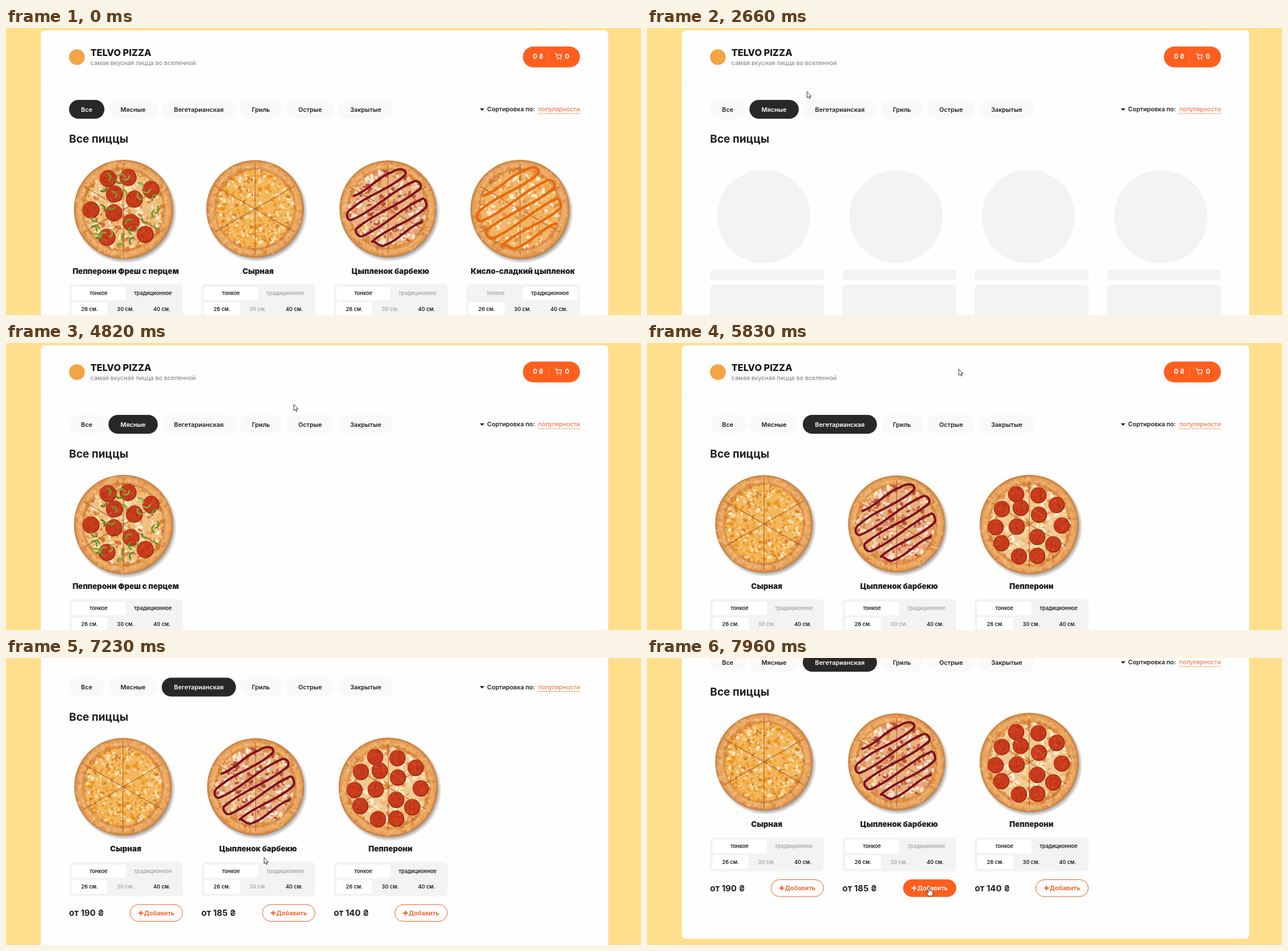
Animation of 1113x503 px, one loop 8000 ms. Source, as an HTML page:

```html
<!DOCTYPE html>
<html lang="ru">
<head>
<meta charset="utf-8">
<title>Pizza shop</title>
<style>
html, body { margin: 0; width: 100%; height: 100%; overflow: hidden; background: #ffdf8c; }
svg { display: block; width: 1113px; height: 503px; font-family: Inter, "Open Sans", sans-serif; }
text { white-space: pre; }
.toggle { animation: 8s step-end infinite; }
#all, #on0 { animation-name: all; }
#skeleton { animation-name: skeleton; }
#meat { animation-name: meat; }
#veg { animation-name: veg; }
#on1 { animation-name: on1; }
#on2 { animation-name: on2; }
#hand { animation-name: hand; }
#arrow { animation-name: arrow; }
#hover { animation: hover 8s linear infinite; }
#page { animation: scroll 8s linear infinite; }
#cursor { animation: move 8s linear infinite; }

@keyframes all { 0% { visibility: visible } 28.125%, 100% { visibility: hidden } }
@keyframes skeleton { 0% { visibility: hidden } 28.125% { visibility: visible } 49.25%, 100% { visibility: hidden } }
@keyframes meat { 0% { visibility: hidden } 49.25% { visibility: visible } 68%, 100% { visibility: hidden } }
@keyframes veg { 0% { visibility: hidden } 68%, 100% { visibility: visible } }
@keyframes on1 { 0% { visibility: hidden } 28.125% { visibility: visible } 66%, 100% { visibility: hidden } }
@keyframes on2 { 0% { visibility: hidden } 66%, 100% { visibility: visible } }
@keyframes hand {
  0%, 29.9%, 67.5% { visibility: hidden }
  18.5%, 64.2%, 96.6%, 100% { visibility: visible }
}
@keyframes arrow {
  0%, 29.9%, 67.5% { visibility: visible }
  18.5%, 64.2%, 96.6%, 100% { visibility: hidden }
}
@keyframes hover { 0%, 96.6% { opacity: 0 } 98.2%, 100% { opacity: 1 } }
@keyframes scroll {
  0%, 88% { transform: translateY(0) }
  88.625% { transform: translateY(-1px) }
  89.5% { transform: translateY(-38px) }
  90.375% { transform: translateY(-91px) }
  91.4% { transform: translateY(-125px) }
  92.4%, 100% { transform: translateY(-135px) }
}
@keyframes move {
  0%, .87% { transform: translate(1130px, 470px) }
  .875% { transform: translate(1092px, 443px) }
  2% { transform: translate(1059px, 350px) }
  3.6% { transform: translate(930px, 283px); animation-timing-function: ease-out }
  7.75%, 13.4% { transform: translate(648px, 230px) }
  17.75% { transform: translate(262px, 146px) }
  18.75%, 20.4% { transform: translate(248px, 143px) }
  20.5%, 25.4% { transform: translate(248px, 138px) }
  26.375%, 28% { transform: translate(248px, 134px) }
  33.25% { transform: translate(280px, 111px) }
  37.6% { transform: translate(319px, 93px) }
  41.5% { transform: translate(365px, 87px) }
  48.4%, 49.2% { transform: translate(445px, 108px) }
  51.75%, 55.8% { transform: translate(450px, 108px); animation-timing-function: ease-out }
  60.25% { transform: translate(504px, 107px); animation-timing-function: ease-in-out }
  65.25%, 66% { transform: translate(299px, 140px); animation-timing-function: ease-in-out }
  72.875%, 79.3% { transform: translate(546px, 45px); animation-timing-function: ease-in-out }
  88%, 93% { transform: translate(452px, 349px); animation-timing-function: ease-in-out }
  98.6%, 100% { transform: translate(494px, 402px) }
}
</style>
</head>
<body>
<svg id="stage" viewBox="0 0 1113 503"></svg>
<script>
const INK = '#202020', ORANGE = '#fe5f1e';

// Mulberry32
let seed = 7;
function rnd() {
  seed = (seed + 0x6d2b79f5) | 0;
  let t = Math.imul(seed ^ (seed >>> 15), 1 | seed);
  t = (t + Math.imul(t ^ (t >>> 7), 61 | t)) ^ t;
  return ((t ^ (t >>> 14)) >>> 0) / 4294967296;
}
const pick = list => list[Math.floor(rnd() * list.length)];

const text = (x, y, s, size, weight = 600, fill = INK, anchor = 'middle') =>
  `<text x="${x}" y="${y}" font-size="${size}" font-weight="${weight}" fill="${fill}" text-anchor="${anchor}">${s}</text>`;
const rect = (x, y, w, h, r, fill, more = '') =>
  `<rect x="${x}" y="${y}" width="${w}" height="${h}" rx="${r}" fill="${fill}" ${more}/>`;
const circle = (x, y, r, fill, more = '') =>
  `<circle cx="${x}" cy="${y}" r="${r}" fill="${fill}" ${more}/>`;
const group = (id, body) => `<g id="${id}" class="toggle">${body}</g>`;
const times = (n, f) => Array.from({ length: n }, (_, i) => f(i)).join('');

// Random place between two radii, as a transform
function place(r0, r1) {
  const a = rnd() * 2 * Math.PI, d = Math.sqrt(r0 * r0 + rnd() * (r1 * r1 - r0 * r0));
  return `translate(${(Math.cos(a) * d).toFixed(1)} ${(Math.sin(a) * d).toFixed(1)}) rotate(${Math.floor(rnd() * 360)})`;
}

const flecks = (n, r0, r1, size, colors, opacity = .8) => times(n, () => {
  const w = size * (.4 + rnd()), h = w * (.35 + rnd() * .5);
  return `<ellipse rx="${w.toFixed(1)}" ry="${h.toFixed(1)}" fill="${pick(colors)}" opacity="${opacity}"
    transform="${place(r0, r1)}"/>`;
});

const cuts = r => [30, 90, 150].map(a =>
  `<path d="M${-r} 0H${r}" stroke="#a8541a" stroke-width="1.5" opacity=".65" transform="rotate(${a})"/>`).join('');

const salami = (spots, r) => spots.map(([x, y]) =>
  circle(x, y, r, '#9c2a12') + circle(x - .5, y - .5, r - 1.2, '#c83a1c') +
  `<g transform="translate(${x} ${y})">${flecks(14, 0, r - 4, 2, ['#dd5530', '#a92a13'], .6)}</g>`).join('');

const peppers = r => times(30, () =>
  `<path d="M-6 2Q0 -6 6 1" fill="none" stroke="${pick(['#6f9a2c', '#88a83c', '#5b8526'])}" stroke-width="3"
    stroke-linecap="round" transform="${place(18, r)}"/>`);

// Serpentine drizzle across the disc
function drizzle(r, gap, color, width) {
  let d = '';
  for (let i = -3; i <= 3; i++) {
    const y = i * gap, half = Math.sqrt(r * r - y * y), side = i % 2 ? 1 : -1;
    if (i === -3) d += `M${-side * half} ${y}`;
    else d += `C${-side * (half + 10)} ${y - gap} ${-side * (half + 10)} ${y} ${-side * half} ${y}`;
    d += `C${-side * half / 3} ${y + 6} ${side * half / 3} ${y - 6} ${side * half} ${y}`;
  }
  return `<path d="${d}" transform="rotate(-32)" fill="none" stroke="${color}" stroke-width="${width}"
    stroke-linecap="round" stroke-linejoin="round"/>`;
}

const pizzaBase = (r, fill) =>
  circle(3, 4, r * 1.04, 'url(#shade)') + circle(0, 0, r, 'url(#crust)') + circle(0, 0, r * .8, fill) +
  flecks(190, r * .84, r * .97, 3, ['#f6c88c', '#dc8f48', '#cf7c34', '#f3bd7c'], .45) +
  flecks(110, r * .77, r * .83, 4, ['#d98236', '#c96f2a', '#eba650'], .6);

const FRESH = [[-27, -54], [8, -56], [-16, -27], [19, -18], [48, -35], [-57, 1], [-17, 6], [13, 23], [-29, 49], [38, 44]];
const CLASSIC = [[-23, -53], [16, -51], [-48, -27], [-15, -29], [48, -34], [17, -17], [-59, 5], [-22, 4], [57, 2],
  [14, 22], [42, 35], [-49, 33], [-18, 56], [14, 55]];
const PALE = ['#fdf1d6', '#f6dcaa', '#efb662', '#fff6e4', '#dd8a3c'];

const pizzas = {
  fresh: () => pizzaBase(87, '#efc080') + flecks(340, 0, 68, 4, [...PALE, '#d0632c']) +
    salami(FRESH, 15) + peppers(66) + cuts(80),
  cheese: () => pizzaBase(85.5, '#f3b75c') +
    flecks(520, 0, 68, 3, ['#f9dfae', '#fdf0d4', '#f39d24', '#ee9018', '#f5b040', '#cf7526']) + cuts(80),
  bbq: () => pizzaBase(85, '#e9b080') +
    flecks(360, 0, 68, 4, [...PALE, '#c4532f', '#a93a28', '#d98a6a', '#fbeee0']) + cuts(78) +
    drizzle(64, 17, '#7c1220', 4),
  sour: () => pizzaBase(87, '#f0b566') +
    flecks(420, 0, 69, 3.5, [...PALE, '#f2a032', '#e8893a']) + cuts(80) + drizzle(68, 18, '#e8690f', 4.5),
  classic: () => pizzaBase(87, '#f0c890') + flecks(340, 0, 69, 4, PALE) + salami(CLASSIC, 14.3) + cuts(76),
};

const colX = i => 110.5 + i * 232;

function addButton(x, on) {
  const fg = on ? '#fff' : '#eb5a1e';
  return rect(x + 107, 523.5, 92, 29.5, 14.7, on ? ORANGE : 'none', `stroke="${on ? ORANGE : '#eb5a1e'}"`) +
    `<path d="M${x + 121.5} 538.3h8.5m-4.25 -4.25v8.5" stroke="${fg}" stroke-width="2"/>` +
    text(x + 158, 542, 'Добавить', 10.9, 600, fg);
}

function card(col, name, kind, cx, cy, price, off = []) {
  const x = colX(col), tone = s => off.includes(s) ? '#a9a9a9' : INK;
  const thick = off.includes('тонкое') ? 1 : 0;
  const opt = (s, dx, y) => text(x + dx, y, s, 9.2, 600, tone(s));
  return `<use href="#${kind}" x="${cx}" y="${cy}"/>` +
    text(x + 99.3, 430.8, name, 13.3, 900) +
    rect(x, 449, 199.5, 60, 7, '#f3f3f3') +
    rect(x + 4.5 + thick * 95, 453.5, 95, 23.5, 4, '#fff') + rect(x + 4.5, 481, 63, 23.5, 4, '#fff') +
    opt('тонкое', 51.7, 468.2) + opt('традиционное', 147, 468.2) +
    opt('26 см.', 36, 495.8) + opt('30 см.', 99, 495.8) + opt('40 см.', 162.7, 495.8) +
    text(x, 543.5, `от ${price} ₴`, 15, 700, INK, 'start') + addButton(x);
}

const skeleton = times(4, i => {
  const x = colX(i);
  return circle(x + 94, 330.5, 81.7, '#f3f3f3') + rect(x, 423.5, 199.5, 18.5, 5, '#f3f3f3') +
    rect(x, 450, 199.5, 62, 6, '#f3f3f3');
});

const pills = [['Все', 110.5, 62], ['Мясные', 179.5, 86.5], ['Вегетарианская', 273, 130],
  ['Гриль', 410, 73.5], ['Острые', 491, 84], ['Закрытые', 582, 97]];
const pill = ([name, x, w], on) => rect(x, 126, w, 33, 16.5, on ? '#282828' : '#f9f9f9') +
  text(x + w / 2, 146.5, name, 10.8, 600, on ? '#fff' : INK);

const header =
  circle(124.3, 51, 13.8, '#f3a444') +
  text(148, 49, 'TELVO PIZZA', 16.3, 800, '#181818', 'start') +
  text(148, 65, 'самая вкусная пицца во вселенной', 10.6, 400, '#7b7b7b', 'start') +
  rect(906, 32.5, 100, 36.5, 18.2, ORANGE) +
  text(932.7, 54.2, '0 ₴', 11.3, 700, '#fff') + text(983.3, 54.2, '0', 11.3, 700, '#fff') +
  rect(950.5, 42, 1, 18, 0, '#fff', 'opacity=".25"') +
  `<path d="M962 45h2.3l1.7 7.5h6.3l1.4-5.4h-8.6" fill="none" stroke="#fff" stroke-width="1.2"/>` +
  circle(966.6, 55, 1.1, '#fff') + circle(972, 55, 1.1, '#fff') +
  rect(61, 97, 994.5, 1, 0, '#f6f6f6');

const sort = `<path d="M831.3 141.2h6.4l-3.2 3.2z" fill="${INK}" stroke="${INK}" stroke-linejoin="round"/>` +
  text(843.3, 146.3, 'Сортировка по:', 10.7, 600, INK, 'start') +
  text(1006, 146.3, 'популярности', 10.7, 400, '#f0682f', 'end') +
  `<path d="M932.5 150h73.5" stroke="#f0682f" stroke-dasharray="2.8 1.7"/>`;

const NO_TRAD = ['традиционное', '30 см.'];
const fresh = card(0, 'Пепперони Фреш с перцем', 'fresh', 206, 318, 150);

document.getElementById('stage').innerHTML = `
<defs>
  <radialGradient id="crust">
    <stop offset=".79" stop-color="#d07c34"/><stop offset=".87" stop-color="#eeb06c"/>
    <stop offset=".94" stop-color="#e6a25c"/><stop offset="1" stop-color="#c47a38"/>
  </radialGradient>
  <radialGradient id="shade">
    <stop offset=".9" stop-color="#333" stop-opacity=".5"/><stop offset="1" stop-color="#333" stop-opacity="0"/>
  </radialGradient>
  ${Object.entries(pizzas).map(([id, draw]) => `<g id="${id}">${draw()}</g>`).join('')}
</defs>
<g id="page">
  ${rect(61, 4, 994.5, 623, 7, '#fefefe')}
  ${header}
  ${pills.map(p => pill(p)).join('')}
  ${times(3, i => group('on' + i, pill(pills[i], true)))}
  ${sort}
  ${text(110.5, 201, 'Все пиццы', 19.1, 700, INK, 'start')}
  ${group('all', fresh + card(1, 'Сырная', 'cheese', 436.5, 317, 190, NO_TRAD) +
    card(2, 'Цыпленок барбекю', 'bbq', 669.5, 317, 185, NO_TRAD) +
    card(3, 'Кисло-сладкий цыпленок', 'sour', 901, 318, 160, ['тонкое']))}
  ${group('skeleton', skeleton)}
  ${group('meat', fresh)}
  ${group('veg', card(0, 'Сырная', 'cheese', 205, 317, 190, NO_TRAD) +
    card(1, 'Цыпленок барбекю', 'bbq', 437.5, 317, 185, NO_TRAD) +
    card(2, 'Пепперони', 'classic', 670, 318, 140) +
    `<g id="hover">${addButton(colX(1), true)}</g>`)}
</g>
<g id="cursor" stroke="#222" stroke-width=".9" fill="#fff" stroke-linejoin="round">
  <path id="arrow" class="toggle" d="M.4 .6V11.6L2.9 9.3L4.6 13L6.2 12.3L4.6 8.7H8Z"/>
  <path id="hand" class="toggle" d="M-1 1.2Q0 -.3 1.1 1.2V5.6Q2.6 4.5 3.4 6Q4.8 5.2 5.4 6.7Q7 6.2 7.2 8V11Q7 13 6 15H-.5Q-2 12.5 -3.8 10.2Q-4.6 8.6 -3 8.4L-1 10Z"/>
</g>`;
</script>
</body>
</html>
```
